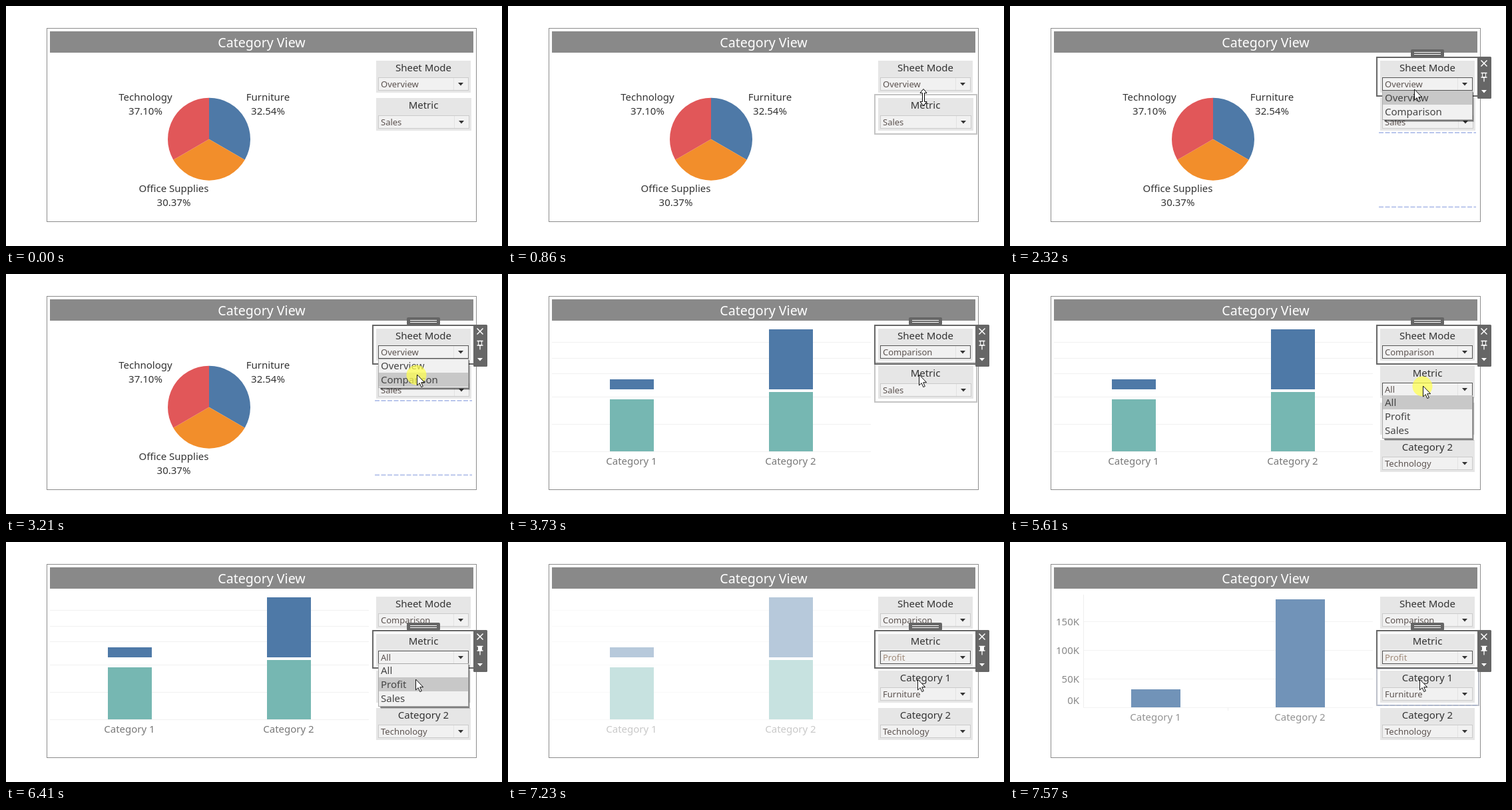
An HTML page for the animation above (8 s loop, 745 by 360 pixels).

```html
<!DOCTYPE html>
<html lang="en">
<head>
<meta charset="utf-8">
<title>Category View</title>
<style>
  html, body { margin: 0; width: 100%; height: 100%; overflow: hidden; background: #fff; }
  svg { display: block; width: 745px; height: 360px; font: 15px "Noto Sans", "Open Sans", sans-serif; }
</style>
</head>
<body>
<svg id="stage" viewBox="0 0 745 360"></svg>
<script>
const LOOP = 8000;
const BLUE = '#4e79a7', ORANGE = '#f28e2b', RED = '#e15759', TEAL = '#76b7b2', DARK = '#666';
const stage = document.getElementById('stage');

const rect = (x, y, w, h, fill, extra = '') =>
  `<rect x="${x}" y="${y}" width="${w}" height="${h}" fill="${fill}" ${extra}/>`;
const frame = (x, y, w, h, stroke, width = 1, fill = 'none') =>
  rect(x, y, w, h, fill, `stroke="${stroke}" stroke-width="${width}"`);
const path = (d, stroke, width = 1, extra = '') =>
  `<path d="${d}" fill="none" stroke="${stroke}" stroke-width="${width}" ${extra}/>`;
const shape = (d, fill, extra = '') => `<path d="${d}" fill="${fill}" ${extra}/>`;
const text = (x, y, str, { size = 15, fill = '#333', weight = 400, anchor = 'middle' } = {}) =>
  `<text x="${x}" y="${y}" font-size="${size}" fill="${fill}" font-weight="${weight}" text-anchor="${anchor}">${str}</text>`;
const faded = (opacity, body) => opacity ? `<g opacity="${opacity}">${body}</g>` : '';

// Pointer moves: start, end, number of steps, from, to
const MOVES = [
  [580, 790, 4, [711, 395], [638, 168]],
  [860, 860, 1, [638, 168], [624, 137]],
  [940, 1200, 4, [624, 137], [605, 121]],
  [2320, 2810, 8, [605, 121], [617, 151]],
  [4870, 5210, 5, [617, 151], [620, 168]],
  [6070, 6410, 6, [620, 168], [615, 206]],
];
const CLICKS = [[1730, 1990], [3210, 3410], [5610, 5810], [6760, 7030]];

function pointerAt(t) {
  let pos = null;
  for (const [start, end, steps, from, to] of MOVES) {
    if (t < start) break;
    const gap = (end - start) / (steps - 1) || 1;
    const k = Math.min(steps, Math.floor((t - start) / gap + 1e-6) + 1) / steps;
    pos = from.map((v, i) => Math.round(v + (to[i] - v) * k));
  }
  return pos;
}

function pie() {
  const cx = 305, cy = 199.7, r = 62;
  const point = deg => {
    const a = (deg - 90) * Math.PI / 180;
    return `${cx + r * Math.cos(a)},${cy + r * Math.sin(a)}`;
  };
  const slices = [BLUE, ORANGE, RED].map((color, i) =>
    shape(`M${cx},${cy}L${point(i * 120)}A${r},${r} 0 0 1 ${point(i * 120 + 120)}Z`, color));
  const label = (x, y, name, share) => text(x, y, name) + text(x, y + 21, share);
  return slices.join('') + label(209.5, 142, 'Technology', '37.10%') +
    label(393.5, 142, 'Furniture', '32.54%') + label(252, 279, 'Office Supplies', '30.37%');
}

const gridLines = (left, ys) => path(ys.map(y => `M${left},${y + .5}H545`).join(''), '#f1f1f1');
const categoryLabels = (x1, x2, y) =>
  [x1, x2].map((x, i) => text(x, y, `Category ${i + 1}`, { fill: '#787878' })).join('');

function stackedBars() {
  const stack = (x, top, mid) => rect(x, top, 66, 173 - top, BLUE) + rect(x, mid, 66, 266 - mid, TEAL);
  return gridLines(66, [102, 126, 149, 184, 225, 266]) +
    stack(153, 158, 188) + stack(392, 83, 177) + categoryLabels(185.5, 424.5, 286);
}

function profitBars() {
  const axis = [['150K', 125], ['100K', 168], ['50K', 211], ['0K', 243]]
    .map(([s, y]) => text(104, y, s, { fill: '#6a6a6a', anchor: 'end' })).join('');
  return gridLines(110, [119, 162, 205, 248]) + path('M110.5,79V248M327.5,248V253', '#ececec') +
    rect(182, 221, 74, 27, BLUE) + rect(399, 86, 74, 162, BLUE) +
    axis + categoryLabels(218.5, 435.5, 268);
}

function chart(t) {
  if (t < 3600) return pie();
  if (t < 3670) return faded(.5, pie());
  if (t < 3730) return faded(.5, stackedBars());
  if (t < 7230) return stackedBars();
  if (t < 7300) return faded(.4, stackedBars());
  if (t < 7440) return gridLines(110, [119, 162, 205, 248]);
  return faded(t < 7570 ? .4 : .8, profitBars());
}

function control(y, title, value, { dark = false, shift = 0, color = '#5c5350' } = {}) {
  const top = y + 25 + shift, right = 695 + shift;
  const arrow = right - 12;
  return rect(556, y, 142 + shift, 48 + shift, '#e6e6e6') +
    text(627, y + 16, title, { weight: 500 }) +
    frame(559.5, top + .5, right - 560, 19, dark ? '#555' : '#cbcbcb', 1, '#f1f1f1') +
    path(`M${right - 22.5},${top + 1}v18`, '#e2e2e2') +
    text(563, top + 15, value, { size: 13, fill: color, anchor: 'start' }) +
    shape(`M${arrow - 4},${top + 8}h8l-4,4.5z`, '#333');
}

function popup(y, items, active) {
  const h = items.length * 21 + 2;
  return rect(563, y + 3, 134, h, '#000', 'opacity=".18"') + rect(562, y + 2, 134, h, '#000', 'opacity=".4"') +
    frame(559.5, y + .5, 135, h - 1, '#aaa', 1, '#f1f1f1') +
    items.map((item, i) =>
      (i === active ? rect(560, y + i * 21, 134, 21, '#c8c8c8') : '') +
      text(563, y + 16 + i * 21, item, { fill: '#444', anchor: 'start' })).join('');
}

const hoverBox = (y, h, color = '#c4c4c4') => frame(551, y + 1, 153, h - 2, color, 2);

function selection(y, h, pinned) {
  const tools = path(`M707.5,${y + 5.5}l9,9m0,-9l-9,9`, '#fff', 1.5) +
    shape(`M709.5,${y + 24.5}h5v6h-5z`, pinned ? '#fff' : 'none', 'stroke="#fff"') +
    path(`M707.5,${y + 24.5}h9M707.5,${y + 31}h9M712,${y + 31}v6.5`, '#fff', 1.3) +
    shape(`M708,${y + 50}h8l-4,4.5z`, '#fff');
  return frame(551, y + 1, 152, h - 2, DARK, 2) +
    rect(702, y, 21, 63, DARK, 'rx="1.5"') + rect(602, y - 11, 50, 12, DARK, 'rx="2"') +
    path(`M607,${y - 6.5}h40m-40,3h40`, '#fff') + tools;
}

const dashes = y => path(`M554,${y}H700`, '#b9c6ec', 2, 'stroke-dasharray="7 2.5"');

function cursor(x, y, resize) {
  if (resize) {
    return shape(`M${x},${y - 12.5}l5,6h-3.5v13h3.5l-5,6l-5,-6h3.5v-13h-3.5z`, '#fff', 'stroke="#000"');
  }
  return shape(`M${x + .5},${y}v16l3.7,-3.4l2.6,6l2.5,-1.1l-2.6,-5.8h5z`, '#fff', 'stroke="#111"');
}

function controls(t, pointer) {
  const py = pointer ? pointer[1] : 999;
  const expanded = t >= 4080;
  const sheetSelected = t >= 1800 && t < 5680, metricSelected = t >= 5680;
  const overSheet = py < 132 && t < 1800;
  const overMetric = t < 1800 && py >= 132 && py < 190 || t >= 3730 && t < 4080;
  let out = '';

  out += control(82, 'Sheet Mode', t < 3600 ? 'Overview' : 'Comparison',
    { dark: overSheet && py < 127 || sheetSelected });
  out += control(138, 'Metric', t < 4080 ? 'Sales' : t < 7230 ? 'All' : 'Profit', {
    shift: expanded ? 0 : 1,
    dark: expanded && py >= 162,
    color: t >= 7230 ? '#a08b7a' : '#5c5350',
  });
  if (expanded) out += control(193, 'Category 1', 'Furniture') + control(249, 'Category 2', 'Technology');

  if (overSheet || sheetSelected && t < 3600) out += dashes(190) + dashes(301.5);
  if (overSheet) out += hoverBox(76, 60);
  if (overMetric) out += hoverBox(132, 61);
  if (t >= 7300) out += hoverBox(189, 57, '#bcc0c9') + path('M552,245H703', '#a9b4cb', 1.5, 'stroke-dasharray="7 2.5"');
  if (sheetSelected) out += selection(76, 60, false);
  if (metricSelected) out += selection(132, 58, true);

  if (t >= 1730 && t < 3410) out += popup(127, ['Overview', 'Comparison'], py < 148 ? 0 : 1);
  if (t >= 5610 && t < 7030) out += popup(182, ['All', 'Profit', 'Sales'], py < 203 ? 0 : 1);
  return out;
}

function draw(t) {
  const pointer = pointerAt(t);
  let out = rect(0, 0, 745, 360, '#fff') + frame(61.5, 33.5, 645, 290, '#8c8c8c') +
    rect(66, 38, 636, 32, '#898989') +
    text(384, 62, 'Category View', { size: 19.6, fill: '#fff', weight: 500 }) +
    chart(t) + controls(t, pointer);
  if (pointer) {
    const [x, y] = pointer;
    if (CLICKS.some(([a, b]) => t >= a && t < b)) {
      out += `<circle cx="${x - .5}" cy="${y + .5}" r="15" fill="#ffff4d" opacity=".72"/>`;
    }
    out += cursor(x, y, t < 940 && y > 130 && y < 140);
  }
  return out;
}

let shown = '';
function tick(now) {
  const next = draw(now % LOOP);
  if (next !== shown) stage.innerHTML = shown = next;
  requestAnimationFrame(tick);
}
stage.innerHTML = shown = draw(0);
requestAnimationFrame(tick);
</script>
</body>
</html>
```
